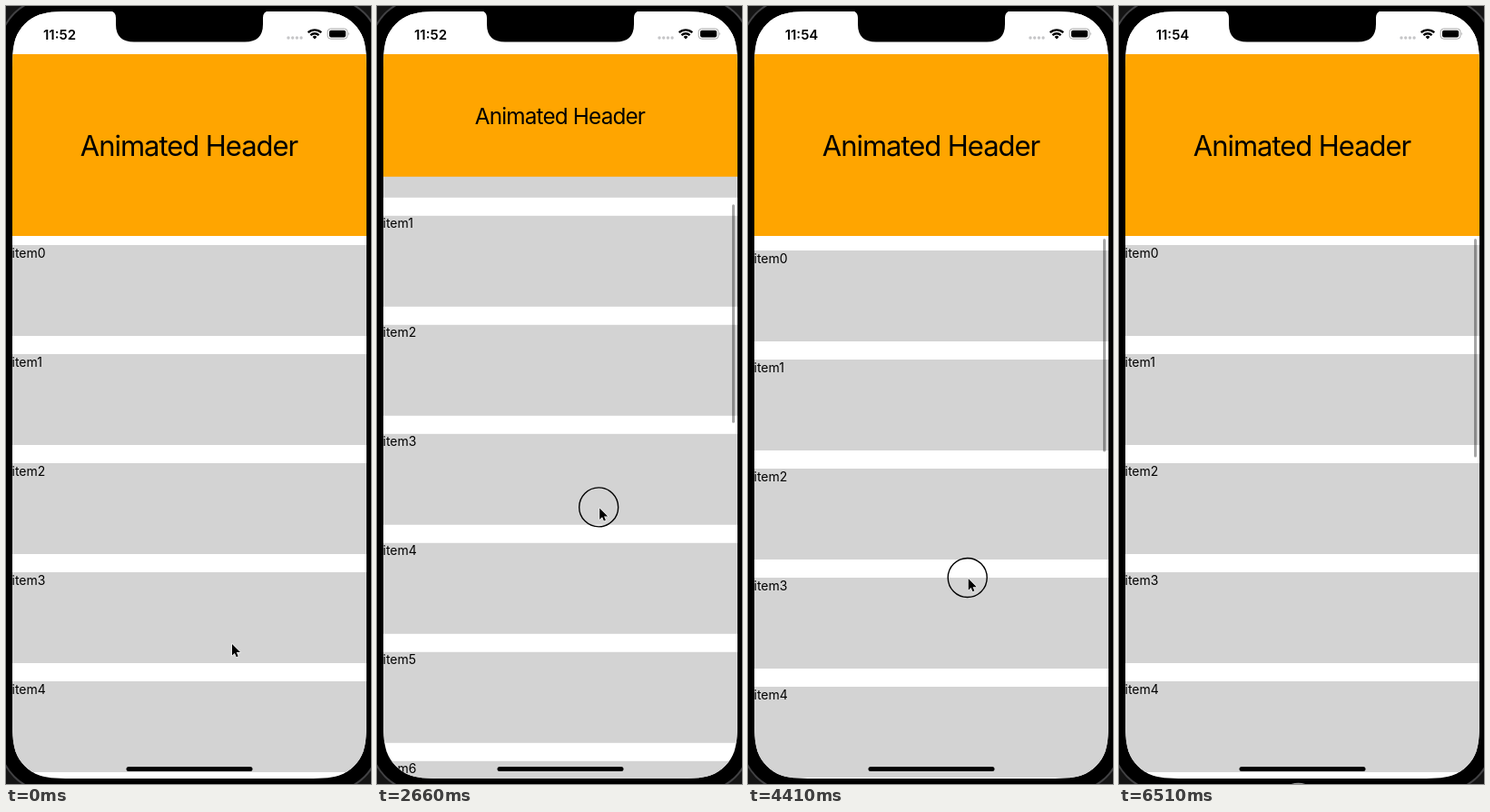
An HTML page that plays this animation: 402x856 px, repeating every 6580 ms.

```html
<!DOCTYPE html>
<html lang="en">
<head>
<meta charset="utf-8">
<title>Animated Header</title>
<style>
  html, body { margin: 0; height: 100%; overflow: hidden; background: #000; }
  svg { display: block; width: 100vw; height: 100vh; }
  text { font-family: Inter, Roboto, sans-serif; }
</style>
</head>
<body>
<svg viewBox="0 0 402 856">
  <defs>
    <clipPath id="screen"><path id="glass"/></clipPath>
    <clipPath id="edge"><rect y="850" width="402" height="6"/></clipPath>
  </defs>
  <rect width="402" height="856" fill="#141414"/>
  <path id="body" stroke="#414143" stroke-width="2"/>

  <g clip-path="url(#screen)">
    <rect width="402" height="856" fill="#fff"/>
    <g id="list" font-size="14"></g>
    <rect id="bar" x="391" width="3" rx="1.5" fill-opacity=".35"/>
    <rect width="402" height="53" fill="#fff"/>
    <rect id="header" x="7" y="53" width="390" fill="#ffa500"/>
    <text id="title" x="201.5" text-anchor="middle">Animated Header</text>
    <rect x="132.5" y="837" width="139" height="5" rx="2.5"/>
  </g>

  <path d="M114 5Q121 6 121 13V20Q121 39.6 141 39.6H263Q283 39.6 283 20V13Q283 6 290 5Z"/>
  <text id="clock" x="59" y="36.5" font-size="15" font-weight="600" text-anchor="middle"></text>
  <path d="M311 35h15" stroke="#c6c6c8" stroke-width="3.4" stroke-linecap="round" stroke-dasharray="0 4.7"/>
  <g fill="none" stroke="#000" stroke-width="2.3">
    <path d="M332.7 29.2A10.6 10.6 0 0 1 347.3 29.2M335.4 32.1A6.7 6.7 0 0 1 344.6 32.1"/>
    <path d="M337.6 33.9A3.6 3.6 0 0 1 342.4 33.9L340 36.5Z" fill="#000" stroke="none"/>
  </g>
  <rect x="354.2" y="25" width="21.8" height="11.2" rx="3.4" fill="none" stroke="#a9a9a9"/>
  <rect x="356" y="26.8" width="18.2" height="7.6" rx="1.8"/>
  <path d="M377.3 28.8q1.8 1.8 0 3.7z" fill="#a9a9a9"/>

  <g id="touch" fill="none" stroke-width="1.4">
    <circle class="ring" r="21.5" stroke="#000"/>
    <g clip-path="url(#edge)"><circle class="ring" r="21.5" stroke="#999"/></g>
  </g>
  <path id="arrow" d="M0 0V12.6L2.9 9.9 4.7 14.2 6.7 13.4 4.9 9.1H9Z"
        stroke="#fff" stroke-width="1.2" stroke-linejoin="round" paint-order="stroke"/>
</svg>
<script>
const LOOP = 6580, STEP = 70;
const $ = id => document.getElementById(id);
const set = (el, attrs) => { for (const k in attrs) el.setAttribute(k, attrs[k]); };
const clamp = (v, lo = 0, hi = 1) => Math.min(hi, Math.max(lo, v));
const ramp = (t, from, to) => (1 - Math.cos(Math.PI * clamp((t - from) / (to - from)))) / 2;

// Turning points of the scroll: [time, offset]
const turns = [
  [690, 0], [1636, 300], [2170, 300], [2938, 0], [3710, 295.3],
  [4410, -6], [5110, 251.4], [5950, -80], [6510, 0]
];
const scrollAt = t => turns.slice(1).reduce((sum, [end, y], i) => {
  const [begin, before] = turns[i];
  return sum + (y - before) * ramp(t, begin, end);
}, 0);

// While pressed, the pointer moves against the scroll.
function pointerAt(t, y) {
  if (t < 350) return [t < STEP ? 248 : 267, 701];
  if (t < 2100) return [267 - y * .073, Math.max(675 - y, 429) - 97 * ramp(t, 1750, 2100)];
  const sway = -11 * Math.sin((t - 3080) / 570);
  const leave = ramp(t, 5600, 6440);
  return [243 + .16 * sway - 46 * leave, 631 + sway - y + 243 * leave];
}

// Rectangle with continuous corners, traced one quarter at a time.
function smoothRect(x, y, w, h, r) {
  const corner = (cx, cy, sx, sy, swap) => {
    const p = (a, b) => swap
      ? `${cx + sx * b * r} ${cy + sy * a * r} `
      : `${cx + sx * a * r} ${cy + sy * b * r} `;
    return 'L' + p(0, 1.529)
      + 'C' + p(0, 1.088) + p(0, .868) + p(.075, .631)
      + 'C' + p(.169, .373) + p(.373, .169) + p(.631, .075)
      + 'C' + p(.868, 0) + p(1.088, 0) + p(1.529, 0);
  };
  const path = corner(x, y, 1, 1) + corner(x + w, y, -1, 1, true)
    + corner(x + w, y + h, -1, -1) + corner(x, y + h, 1, -1, true);
  return 'M' + path.slice(1) + 'Z';
}

set($('glass'), { d: smoothRect(7, 6, 390, 844, 47.3) });
set($('body'), { d: smoothRect(-9, -10, 422, 876, 62) });

for (let i = 0; i < 10; i++) {
  const y = i * 120;
  $('list').insertAdjacentHTML('beforeend',
    `<rect x="7" y="${y}" width="390" height="100" fill="#d3d3d3"/><text x="6.5" y="${y + 13.5}">item${i}</text>`);
}

function draw(t) {
  const y = scrollAt(t);
  const shrink = clamp(y / 200);
  const height = 200 - 150 * shrink, bottom = 53 + height;
  const size = 32 - 16 * shrink;

  set($('list'), { transform: `translate(0 ${bottom + 10 - y})` });
  set($('header'), { height });
  set($('title'), {
    y: 53 + height / 2 + size * .38,
    'font-size': size * .97,
    'letter-spacing': -size * (.007 + .026 * clamp((size - 16) / 7))
  });
  set($('bar'), {
    y: bottom + 3 + .316 * Math.max(y, 0),
    height: 240.5 + Math.min(y, 0),
    opacity: t < 690 ? 0 : t < 2170 ? 1 - ramp(t, 1470, 1680) : 1
  });
  $('clock').textContent = t < 2800 ? '11:52' : '11:54';

  const [cx, cy] = pointerAt(t, y);
  const pressed = t >= 350 && t < 1330 || t >= 2100;
  set($('touch'), { visibility: pressed ? 'visible' : 'hidden' });
  document.querySelectorAll('.ring').forEach(ring => set(ring, { cx, cy }));
  set($('arrow'), { transform: `translate(${cx + 1} ${cy + 1})` });
}

const start = performance.now();
function tick() {
  const t = (performance.now() - start) % LOOP;
  draw(Math.floor(t / STEP) * STEP);
  requestAnimationFrame(tick);
}
tick();
</script>
</body>
</html>
```
